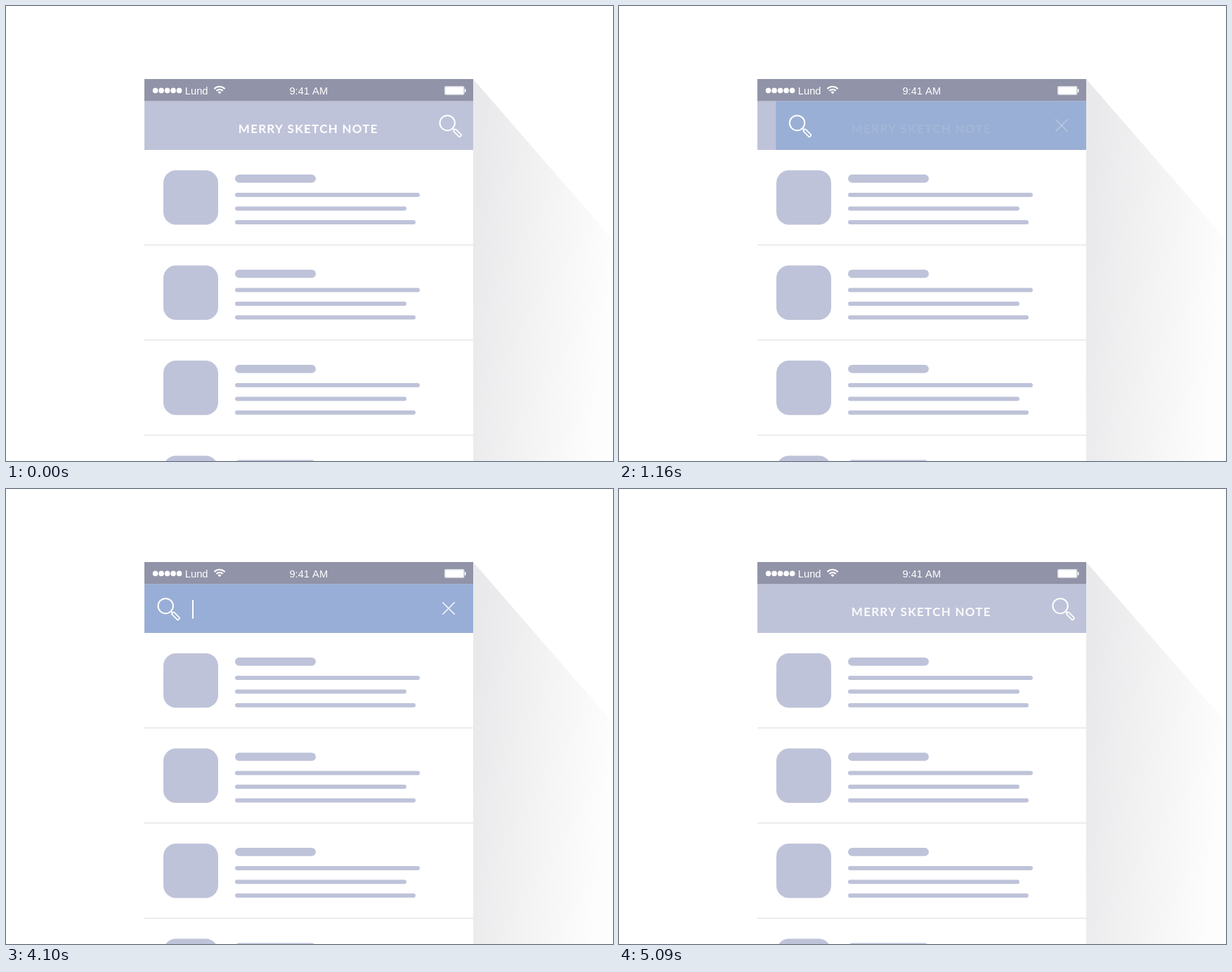
These frames come from a looping animation (864x648 px, 6380 ms). An HTML page with a canvas:

```html
<!DOCTYPE html>
<html lang="en">
<head>
<meta charset="utf-8">
<title>Search bar</title>
<style>
html, body { margin: 0; width: 100%; height: 100%; overflow: hidden; background: #fff; }
canvas { display: block; width: 864px; height: 648px; }
</style>
</head>
<body>
<canvas id="stage" width="864" height="648"></canvas>
<script>
const ctx = document.getElementById('stage').getContext('2d');
const LOOP = 6380, STEP = 30, LAST = 5090;
const LAVENDER = '#bfc3d9', BLUE = '#98aed6', SLATE = '#9193a8';
const LEFT = 197, RIGHT = 665, TOP = 104, HEADER = 135.5, BODY = 205;

const ramp = (t, a, b) => Math.min(1, Math.max(0, (t - a) / (b - a)));
const easeInOut = (u, n) =>
  u < 0.5 ? Math.pow(2 * u, n) / 2 : 1 - Math.pow(2 - 2 * u, n) / 2;

function rect(x, y, w, h, color) {
  ctx.fillStyle = color;
  ctx.fillRect(x, y, w, h);
}

function round(x, y, w, h, r, color) {
  ctx.fillStyle = color;
  ctx.beginPath();
  ctx.roundRect(x, y, w, h, r);
  ctx.fill();
}

function disc(x, y, r) {
  ctx.beginPath();
  ctx.arc(x, y, r, 0, 2 * Math.PI);
  ctx.fill();
}

function line(x1, y1, x2, y2) {
  ctx.beginPath();
  ctx.moveTo(x1, y1);
  ctx.lineTo(x2, y2);
  ctx.stroke();
}

function withAlpha(alpha, draw) {
  if (alpha <= 0) return;
  ctx.save();
  ctx.globalAlpha = alpha;
  draw();
  ctx.restore();
}

function drawShadow() {
  const g = ctx.createLinearGradient(RIGHT, 300, 864, 316);
  g.addColorStop(0, '#e9e9eb');
  g.addColorStop(0.5, '#f3f3f4');
  g.addColorStop(1, '#fdfdfd');
  ctx.fillStyle = g;
  ctx.beginPath();
  ctx.moveTo(RIGHT, TOP);
  ctx.lineTo(864, 333);
  ctx.lineTo(864, 648);
  ctx.lineTo(RIGHT, 648);
  ctx.fill();
}

function drawRow(y) {
  round(224, y + 29, 78, 77.5, 18, LAVENDER);
  round(326, y + 35, 115, 11.8, 5.9, LAVENDER);
  [263, 244, 257].forEach((w, i) =>
    round(326, y + 61 + i * 19.5, w, 6, 3, LAVENDER));
  rect(LEFT, y + 134.7, RIGHT - LEFT, 1.1, '#dfdfe2');
}

function drawWifi(x, y) {
  ctx.lineWidth = 2.1;
  for (const r of [6.3, 10.4]) {
    ctx.beginPath();
    ctx.arc(x, y, r, -Math.PI * 0.76, -Math.PI * 0.24);
    ctx.stroke();
  }
  ctx.beginPath();
  ctx.moveTo(x, y);
  ctx.arc(x, y, 3.4, -Math.PI * 0.76, -Math.PI * 0.24);
  ctx.fill();
}

function drawStatus() {
  ctx.fillStyle = ctx.strokeStyle = '#fff';
  for (let i = 0; i < 5; i++) disc(212.6 + i * 8.5, 120.4, 3.8);
  ctx.font = '14.7px "Liberation Sans", Arial, sans-serif';
  ctx.textAlign = 'left';
  ctx.fillText('Lund', 254.8, 126);
  ctx.textAlign = 'center';
  ctx.fillText('9:41 AM', 430.8, 126);
  drawWifi(304, 125.2);
  round(624, 114, 28.5, 12.8, 2, '#d9dae2');
  round(625.5, 115.4, 25.6, 10, 1, '#fff');
  round(652.8, 118, 1.7, 5, 0.8, '#fff');
}

function drawTitle() {
  ctx.fillStyle = '#fff';
  ctx.font = 'bold 17px Lato, sans-serif';
  ctx.letterSpacing = '1.25px';
  ctx.textAlign = 'center';
  ctx.fillText('MERRY SKETCH NOTE', 430.3, 181);
}

function drawLens(x) {
  ctx.save();
  ctx.translate(x, 166.6);
  ctx.strokeStyle = '#fff';
  ctx.lineWidth = 2;
  ctx.beginPath();
  ctx.arc(0, 0, 10.7, 0, 2 * Math.PI);
  ctx.stroke();
  ctx.rotate(Math.PI / 4);
  line(11, 0, 14, 0);
  ctx.lineWidth = 1.7;
  ctx.beginPath();
  ctx.roundRect(14, -2.1, 12.6, 4.2, 1);
  ctx.stroke();
  ctx.restore();
}

function drawCross() {
  ctx.strokeStyle = '#fff';
  ctx.lineWidth = 1.4;
  line(621.3, 161.3, 638.7, 178.7);
  line(638.7, 161.3, 621.3, 178.7);
}

// A touch spot fades in, waits, then swells and vanishes.
function drawTouch(t, x, y, start, release) {
  const u = ramp(t, release, release + 240);
  const alpha = 0.45 * ramp(t, start, start + 90) * (1 - u);
  withAlpha(alpha, () => {
    ctx.fillStyle = '#fff';
    disc(x, y, 38 + 21.6 * Math.sin(u * Math.PI / 2));
  });
}

function render(time) {
  const phase = time < 500 ? 0 : 20;
  const t = Math.min(LAST, Math.floor((time - phase) / STEP) * STEP + phase);
  const open = easeInOut(ramp(t, 720, 1310), 3) - easeInOut(ramp(t, 4520, 5110), 3);
  const lensX = 628.2 - 401 * open;

  rect(0, 0, 864, 648, '#fff');
  drawShadow();
  rect(LEFT, TOP, RIGHT - LEFT, 648 - TOP, '#fff');
  for (let i = 0; i < 4; i++) drawRow(BODY + i * 135.5);
  rect(LEFT, HEADER, RIGHT - LEFT, BODY - HEADER, LAVENDER);
  rect(LEFT, TOP, RIGHT - LEFT, HEADER - TOP, SLATE);

  const panelX = lensX - 30.2;
  withAlpha(open, () => rect(panelX, HEADER, RIGHT - panelX, BODY - HEADER, BLUE));
  drawTouch(t, 630, 168, 150, 680);
  drawTouch(t, 230, 170, 4100, 4490);

  drawStatus();
  withAlpha(1 - ramp(t, 710, 1210) + ramp(t, 4700, 5120), drawTitle);
  withAlpha(ramp(t, 1080, 1340) - ramp(t, 4670, 5000), drawCross);
  withAlpha(easeInOut(ramp(t, 1400, 4440), 5) * (1 - ramp(t, 4490, 4610)),
    () => rect(265, 158, 2, 26.5, '#fff'));
  drawLens(lensX);
}

const began = performance.now();
function tick() {
  render((performance.now() - began) % LOOP);
  requestAnimationFrame(tick);
}
tick();
</script>
</body>
</html>
```
